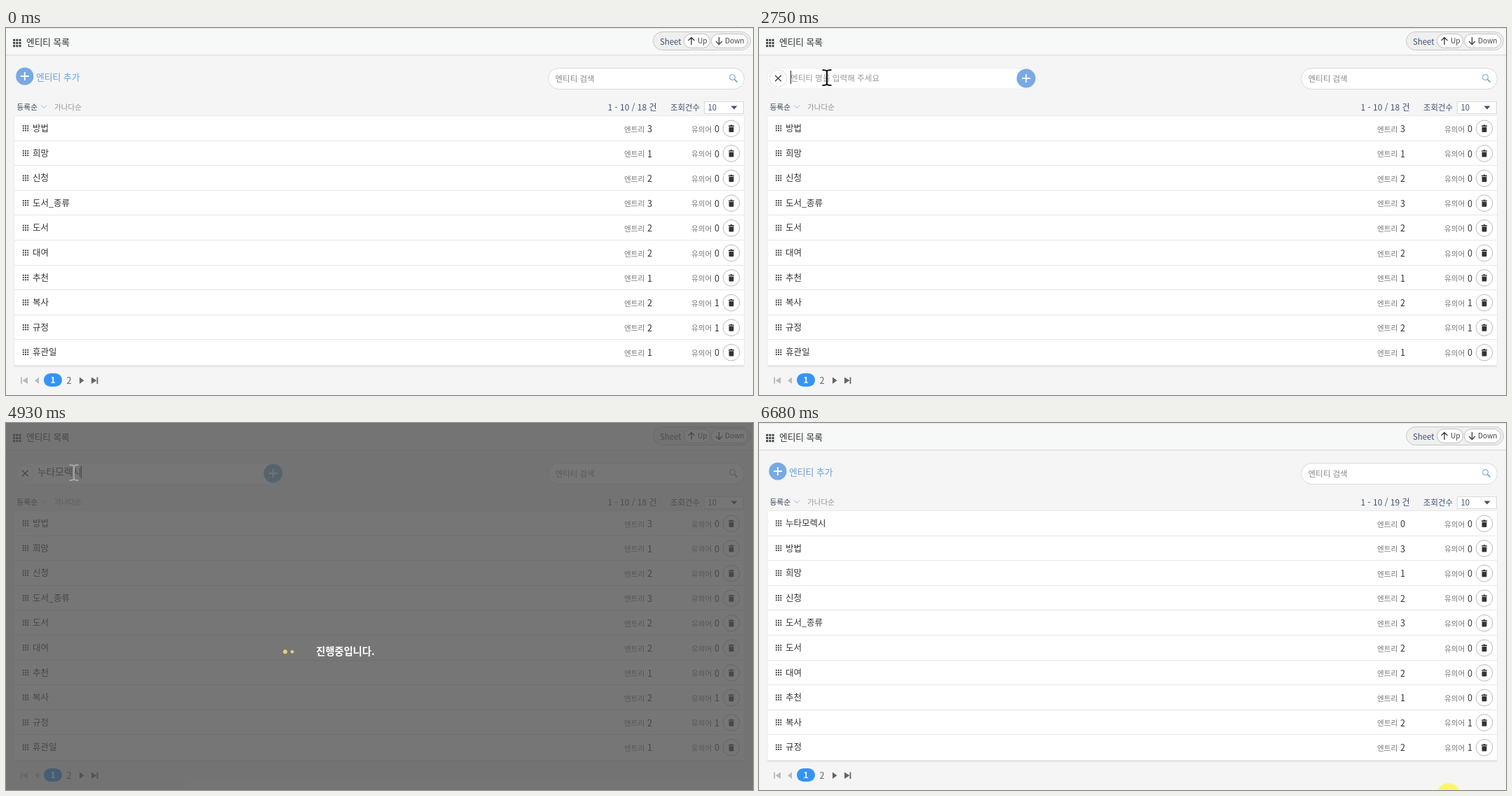
Write an HTML page that moves like this. It is 1067 px wide and 525 px high and loops after 6810 ms.

```html
<!DOCTYPE html>
<html lang="ko">
<head>
<meta charset="utf-8">
<title>엔티티 목록</title>
<style>
html, body { margin: 0; width: 100%; height: 100%; overflow: hidden; background: #f5f5f5; }
svg { display: block; width: 100vw; height: 100vh; }
text { font-family: "Noto Sans CJK KR", "Noto Sans CJK", "Noto Sans CJK JP", "Noto Sans", sans-serif; white-space: pre; }
</style>
</head>
<body>
<svg id="stage" viewBox="0 0 1067 525"></svg>
<script>
const LOOP = 6810, TICK = 67;
const NAME = '누타모렉시';
const NAVY = '#3d5273', BLUE = '#79a9e2';

// Text is placed by its left edge and the middle of its line, on a whole-pixel baseline.
const text = (x, cy, size, fill, str, extra = '') =>
  `<text x="${x}" y="${Math.round(cy + size * 0.37)}" font-size="${size}" fill="${fill}" ${extra}>${str}</text>`;
const box = (x, y, w, h, r, fill, stroke = 'none') =>
  `<rect x="${x}" y="${y}" width="${w}" height="${h}" rx="${r}" fill="${fill}" stroke="${stroke}"/>`;
const path = (d, stroke, width = 1, fill = 'none') =>
  `<path d="${d}" stroke="${stroke}" stroke-width="${width}" fill="${fill}"/>`;
const circle = (x, y, r, fill, stroke = 'none') =>
  `<circle cx="${x}" cy="${y}" r="${r}" fill="${fill}" stroke="${stroke}"/>`;
const group = (id, body, extra = '') => `<g id="${id}" ${extra}>${body}</g>`;

function dots(cx, cy, pitch, size, fill) {
  let out = '';
  for (let i = 0; i < 9; i++) {
    out += box(cx + (i % 3 - 1) * pitch - size / 2, cy + (Math.floor(i / 3) - 1) * pitch - size / 2, size, size, 0, fill);
  }
  return out;
}

const plus = (x, y, r) => circle(x, y, r, BLUE) +
  path(`M${x - 6} ${y}h12M${x} ${y - 6}v12`, '#fff', 1.8);

const trash = (x, y) => circle(x, y, 11.8, '#fff', '#b9b9b9') +
  path(`M${x - 4} ${y - 4.2}h2.3l.7-1h2l.7 1h2.3v1.4h-8zM${x - 3.4} ${y - 2}h6.8v6.2q0 1-1 1h-4.8q-1 0-1-1z`, 'none', 0, '#333');

function row([name, entries, synonyms], i) {
  const cy = 143.4 + i * 35.6;
  return (i ? path(`M12 ${Math.floor(cy - 18) + 0.5}H1054`, '#e6e6e6') : '') +
    dots(28, cy, 3.2, 2, '#4a4a4a') +
    text(38, cy, 12.5, '#333', name) +
    text(883, cy + 1.2, 10.6, '#777', '엔트리') + text(916, cy + 1, 12.6, '#333', entries) +
    text(979, cy + 1.2, 10.6, '#777', '유의어') + text(1012, cy + 1, 12.6, '#333', synonyms) +
    trash(1036, cy + 0.4);
}

const rows = [['방법', 3, 0], ['희망', 1, 0], ['신청', 2, 0], ['도서_종류', 3, 0], ['도서', 2, 0],
  ['대여', 2, 0], ['추천', 1, 0], ['복사', 2, 1], ['규정', 2, 1], ['휴관일', 1, 0]];
const list = (items, total) => items.slice(0, 10).map(row).join('') +
  text(859.5, 113.5, 12, NAVY, `1 - 10 / ${total} 건`);

const header =
  box(0, 0, 1067, 38, 0, '#f7f8f8') + path('M0 .5H1067', '#e6e6e6') +
  path('M0 38.5H1067', '#dedede') + path('M0 39.5H1067', '#ededed') +
  dots(15.8, 21.5, 4.2, 3, '#444') + text(29, 20.8, 12.7, '#333', '엔티티 목록') +
  box(924.5, 5.5, 139, 26, 13, '#efefef', '#c8c8c8') + text(934, 19.5, 11.4, NAVY, 'Sheet') +
  box(968.5, 8.5, 37, 20, 10, '#fff', '#bdbdbd') + box(1007.5, 8.5, 52, 20, 10, '#fff', '#bdbdbd') +
  path('M979 24V13.5M974.5 18l4.5-4.5 4.5 4.5M1018.5 13v10.5M1014 19l4.5 4.5 4.5-4.5', '#444', 1.4) +
  text(988, 18.5, 10.2, '#444', 'Up') + text(1027, 18.5, 10.2, '#444', 'Down');

const tools =
  box(774.5, 57.5, 280, 30, 15, '#fff', '#d9d9d9') + text(784.5, 72.3, 11.5, '#888', '엔티티 검색') +
  circle(1037.5, 70.5, 4, 'none', '#5b96d0') + path('M1040.5 73.5l4 4', '#5b96d0', 1.6) +
  text(15.5, 113.3, 10.7, '#35425a', '등록순') + path('M50 110.5l4 4 4-4', '#8fb8dd') +
  text(69, 113.3, 10.6, '#959595', '가나다순') + text(949, 113.7, 11.4, NAVY, '조회건수') +
  box(997.5, 105.5, 56, 17, 0, '#fff', '#d9d9d9') + text(1002.5, 114, 11.2, NAVY, '10') +
  path('M1035.5 111.5h9l-4.5 5z', 'none', 0, NAVY);

const sheet = [0, 1, 2, 3].map(i => path(`M12 ${482.5 + i}H1054`, ['#d6d6d6', '#e0e0e0', '#eaeaea', '#f1f1f1'][i])).join('') +
  box(11.5, 125.5, 1043, 357, 1, '#fff', '#e9e9e9');

const pager =
  path('M22 499.5v9.5', '#bbb', 1.8) + path('M31 499.5v9.5l-7.5-4.75zM47 499.5v9.5l-6-4.75z', 'none', 0, '#bbb') +
  box(54, 494, 26, 19, 9.5, '#3494f6') + text(63.5, 504, 12, '#fff', '1', 'font-weight="700"') +
  text(86.5, 504, 12.6, '#666', '2') +
  path('M105 499.5v9.5l6.5-4.75zM122 499.5v9.5l7.5-4.75z', 'none', 0, '#666') + path('M130.5 499.5v9.5', '#666', 1.8);

const entry =
  '<clipPath id="clip"><rect id="clipBox" x="44" y="55" height="35"/></clipPath>' +
  '<rect id="bar" x="12" y="57.5" height="29.5" rx="14.7" fill="#fff" stroke="#ececec"/>' +
  circle(27.3, 72, 12.3, '#fff', '#dedede') + path('M23 67.7l8.6 8.6M31.6 67.7l-8.6 8.6', '#444', 1.4) +
  `<g clip-path="url(#clip)">${text(45, 71.7, 11.6, '#999', '엔티티 명을 입력해 주세요', 'id="hint"')}</g>` +
  text(45, 70.2, 13.7, '#444', '', 'id="typed"') +
  '<path id="underline" stroke="#444"/><path id="caret" stroke="#222"/>' +
  group('send', plus(0, 72, 13.4));

const hand = path('M-1.5 16V3a2.3 2.3 0 0 1 4.6 0v8l7.5 2q3 1 2.8 4.5l-1.4 7q-.4 3-2 5.5H0q-1-3.5-3.8-6l-5-7q-1.6-3 .8-3.8 3.2-.4 6.5 2.8zM6.8 12v4M10.5 13v4', '#222', 1.5, '#fff');
const beam = 'M90.5 60q5 0 6.5 1.5 1.5-1.5 6.5-1.5M97 61v20M90.5 82q5 0 6.5-1.5 1.5 1.5 6.5 1.5';

document.getElementById('stage').innerHTML =
  box(0, 0, 1067, 525, 0, '#f5f5f5') + header + tools + sheet +
  group('before', list(rows, 18)) + group('after', list([[NAME, 0, 0], ...rows], 19)) + pager +
  group('add', plus(26.8, 69, 12.6)) + text(43, 70, 12.8, '#6c9fdc', '엔티티 추가', 'id="addLabel"') +
  group('entry', entry) +
  group('busy', box(0, 0, 1067, 525, 0, 'rgba(77,77,77,.77)') +
    [0, 1, 2].map(i => `<circle class="beat" cx="${398.8 + i * 10}" cy="327.3" fill="#e3d477"/>`).join('') +
    text(443, 327.2, 14.3, '#fff', '진행중입니다.', 'font-weight="700"')) +
  `<path id="beam" d="${beam}" fill="none" stroke-width="2"/>` +
  group('pointer', '<circle id="glow" r="17" fill="#fffa00" fill-opacity=".55"/>' + group('hand', hand));

const el = id => document.getElementById(id);
const show = (id, on) => { el(id).style.display = on ? '' : 'none'; };
const within = (t, a, b) => t >= a && t < b;
const ramp = (t, a, b) => Math.min(1, Math.max(0, (t - a) / (b - a)));
const smooth = u => u * u * (3 - 2 * u);

const moves = [[180, 538, 516], [970, 36, 70], [1450, 36, 70], [1680, 97, 70],
  [5750, 97, 70], [6480, 960, 506], [6680, 985, 532]];
function pointerAt(t) {
  let [, x, y] = moves[0];
  for (let i = 1; i < moves.length; i++) {
    const [t0, x0, y0] = moves[i - 1], [t1, x1, y1] = moves[i];
    if (t < t0) break;
    const u = smooth(ramp(t, t0, t1));
    x = x0 + (x1 - x0) * u;
    y = y0 + (y1 - y0) * u;
  }
  return [x, y];
}

// Each key press composes the next Hangul state.
const keys = [[3410, 'ㄴ'], [3480, '누'], [3550, '눝'], [3680, '누타'], [3740, '누탐'], [3810, '누타모'],
  [3940, '누타몰'], [4010, '누타모레'], [4140, '누타모렉'], [4340, '누타모렋'], [4470, NAME]];

function draw(now) {
  const time = now % LOOP;
  const t = time < 180 ? time : 180 + Math.floor((time - 180) / TICK + 0.2) * TICK;

  const saved = time >= 4990, busy = within(time, 4860, 4990);
  show('before', !saved);
  show('after', saved);
  show('busy', busy);
  document.querySelectorAll('.beat').forEach((dot, i) =>
    dot.setAttribute('r', Math.max(0, 4 - Math.abs(i * 2.8 - (time - 4860) / TICK))));

  const open = within(time, 1470, 5400);
  show('add', !open);
  show('addLabel', !within(time, 1470, 5550));
  show('entry', open);
  const grow = time < 4800 ? ramp(t, 1400, 1950) : saved ? 1 - ramp(time, 4876, 5376) : 1;
  const width = Math.max(30, 383 * grow);
  el('bar').setAttribute('width', width);
  el('clipBox').setAttribute('width', Math.max(0, width - 60));
  el('send').setAttribute('transform', `translate(${Math.max(27, width - 1.5)} 0)`);

  const typed = saved ? '' : keys.reduce((word, [at, next]) => time >= at ? next : word, '');
  const end = 45.5 + typed.length * 12.4;
  el('typed').textContent = typed;
  show('hint', !typed);
  show('underline', typed && !busy);
  el('underline').setAttribute('d', `M45 79.5H${end}`);
  show('caret', typed || within(time, 1800, 2220) || within(time, 2750, 3280) || within(time, 4990, 5380));
  el('caret').setAttribute('d', `M${end} 61V80`);

  const [x, y] = pointerAt(t);
  const beamOn = within(time, 1610, 5800);
  show('beam', beamOn);
  el('beam').setAttribute('stroke', busy ? '#a8a8a8' : '#111');
  show('pointer', time >= 180);
  show('hand', !beamOn);
  el('pointer').setAttribute('transform', `translate(${x} ${y})`);
  el('glow').setAttribute('opacity', beamOn ? 1 - ramp(time, 1680, 2030) : 1);
}

function frame() {
  draw(performance.now());
  requestAnimationFrame(frame);
}
frame();
</script>
</body>
</html>
```
